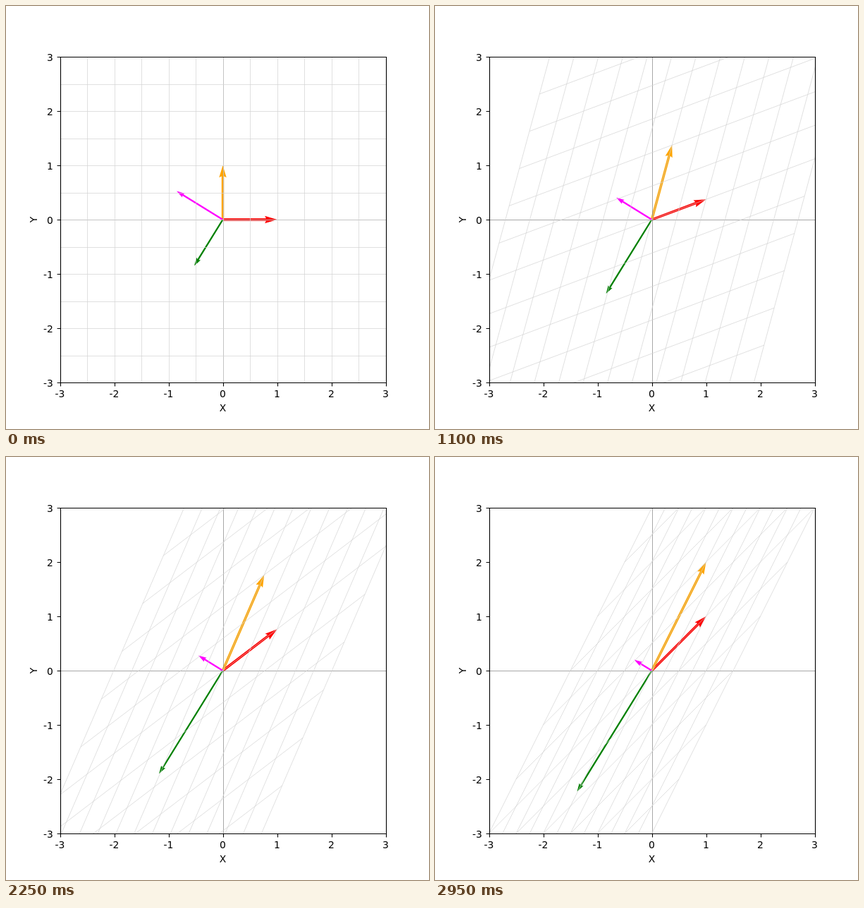
Animation of 600x600 px, one loop 3000 ms. Source, as an HTML page with a canvas:

```html
<!DOCTYPE html>
<html lang="en">
<head>
<meta charset="utf-8">
<title>Linear map of the plane</title>
<style>
  html, body { margin: 0; width: 100%; height: 100%; overflow: hidden; background: #fff; }
  canvas, svg { position: absolute; left: 0; top: 0; width: 600px; height: 600px; }
  text { font: 13.889px "DejaVu Sans", sans-serif; text-anchor: middle; }
  .side { text-anchor: end; }
  path { fill: none; stroke: #000; stroke-width: 1.11; }
</style>
</head>
<body>
<canvas id="plot" width="600" height="600"></canvas>
<svg id="axes" viewBox="0 0 600 600">
  <path d="M77.5 72.5H539.5V534.5H77.5Z"/>
  <text x="307.5" y="575">X</text>
  <text transform="translate(43.5 303) rotate(-90)">Y</text>
</svg>
<script>
const LOOP = 3000, STEP = 50, LAST = LOOP / STEP - 1;
const UNIT = 77, CX = 307.5, CY = 303;
const PT = 600 / 432;
const ctx = document.getElementById('plot').getContext('2d');

// Unit eigenvectors of [[1, 1], [1, 2]]
const phi = (1 + Math.sqrt(5)) / 2;
const c = 1 / Math.hypot(1, phi), s = phi * c;

const arrows = [
  { v: [1, 0], color: 'red', width: 3.465 },
  { v: [0, 1], color: 'orange', width: 3.465 },
  { v: [-c, -s], color: 'green', width: 2.31 },
  { v: [-s, c], color: 'magenta', width: 2.31 }
];

function buildTicks() {
  let marks = '', labels = '';
  for (let n = -3; n <= 3; n++) {
    const x = CX + n * UNIT, y = CY - n * UNIT;
    marks += `M${x + 1} 534.5v4.9M77.5 ${y + 0.5}h-4.9`;
    labels += `<text x="${x}" y="555">${n}</text>` +
              `<text class="side" x="66.8" y="${y + 6}">${n}</text>`;
  }
  document.getElementById('axes')
    .insertAdjacentHTML('beforeend', `<path d="${marks}"/>${labels}`);
}

// Blend from the identity to [[1, 1], [1, 2]]
const map = ([x, y], t) => [x + t * y, t * x + (1 + t) * y];
const toPixel = ([x, y]) => [CX + x * UNIT, CY - y * UNIT];
const snap = p => Math.floor(p + 0.5) + 0.5;

function drawLine(a, b, color) {
  let [x1, y1] = toPixel(a), [x2, y2] = toPixel(b);
  if (Math.abs(x1 - x2) < 1e-6 || Math.abs(y1 - y2) < 1e-6) {
    [x1, y1, x2, y2] = [x1, y1, x2, y2].map(snap);
  }
  ctx.strokeStyle = color;
  ctx.lineWidth = 0.5 * PT;
  ctx.beginPath();
  ctx.moveTo(x1, y1);
  ctx.lineTo(x2, y2);
  ctx.stroke();
}

function drawArrow({ v, color, width }, t) {
  const [x, y] = map(v, t);
  const len = Math.hypot(x, y) * UNIT / width;
  ctx.save();
  ctx.translate(CX, CY);
  ctx.rotate(Math.atan2(-y, x));
  ctx.scale(width, width);
  ctx.beginPath();
  ctx.moveTo(0, -0.5);
  ctx.lineTo(len - 4.5, -0.5);
  ctx.lineTo(len - 5, -1.5);
  ctx.lineTo(len, 0);
  ctx.lineTo(len - 5, 1.5);
  ctx.lineTo(len - 4.5, 0.5);
  ctx.lineTo(0, 0.5);
  ctx.closePath();
  ctx.fillStyle = color;
  ctx.fill();
  ctx.restore();
}

function draw(t) {
  ctx.clearRect(0, 0, 600, 600);
  ctx.save();
  ctx.beginPath();
  ctx.rect(77, 72, 462, 462);
  ctx.clip();
  arrows.forEach(a => drawArrow(a, t));
  drawLine([-3, 0], [3, 0], 'gray');
  drawLine([0, -3], [0, 3], 'gray');
  for (let k = -3; k <= 3; k += 0.5) {
    drawLine(map([k, -3], t), map([k, 3], t), 'lightgray');
    drawLine(map([-3, k], t), map([3, k], t), 'lightgray');
  }
  ctx.restore();
}

const start = performance.now();
function tick() {
  const time = (performance.now() - start) % LOOP;
  draw(Math.floor(time / STEP) / LAST);
  requestAnimationFrame(tick);
}

buildTicks();
tick();
</script>
</body>
</html>
```
